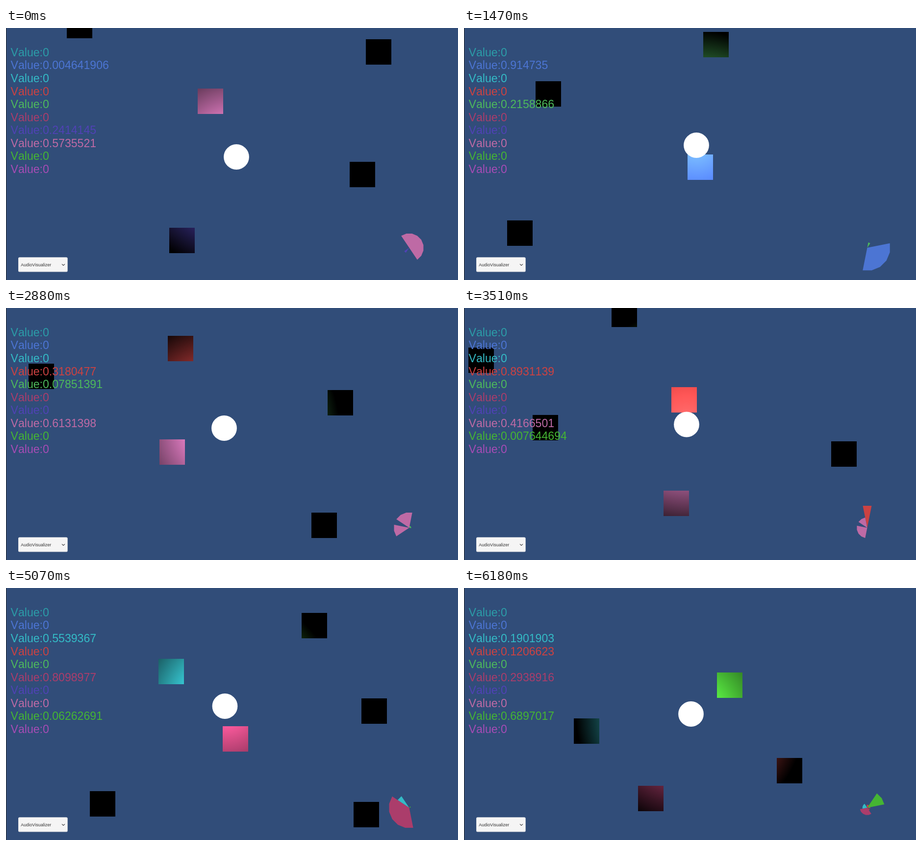
An HTML page with a canvas that plays this animation: 922x516 px, repeating every 6.23 s.

```html
<!DOCTYPE html>
<html lang="en">
<head>
<meta charset="utf-8">
<title>Sound sources</title>
<style>
  html, body { margin: 0; width: 100%; height: 100%; overflow: hidden; background: #314d79; }
  canvas { display: block; }
</style>
</head>
<body>
<canvas id="stage" width="922" height="516"></canvas>
<script>
const ctx = document.getElementById('stage').getContext('2d');
const LOOP = 6230, STEP = 30, FRAMES = 207;
const SIZE = 52, RADIUS = 25.9;
const HEARING = 260.6, FADE = 235;      // loudness reaches 0 / spans this many px
const LIGHT = 235, GLOW = 1.76;         // light radius and strength at its middle
const CENTER = { x: 461.5, y: 258 }, LAG = 12;
const DIAL = { x: 822.5, y: 450, scale: 51.5, parts: 16 };
const PART = Math.PI * 2 / DIAL.parts;
const PINK = 7;

const body = (x, y, ...rgb) => ({ x, y, rgb });
const bodies = [
  body(-120.5, 128, 43, 157, 168),
  body(727, 300, 76, 117, 211),
  body(19.5, -142.7, 52, 187, 198),
  body(433.7, -62, 204, 66, 66),
  body(759.5, 49, 77, 185, 92),
  body(150.3, -5, 171, 61, 107),
  body(359, 435, 80, 66, 181),
  body(417.2, 149.8, 190, 106, 165),
  body(311.4, -237, 69, 181, 51),
  body(-900, -900, 166, 76, 181)
];

// Scroll of the world, turning points: [ms, position, speed per second]
const pathX = [
  [0, 0, -102], [1470, -245.4, -150], [1770, -259, 0], [2880, -78, 198], [3510, 15.6, 90],
  [4200, 148.5, 198], [5070, 317.4, 180], [5400, 362, 0], [6180, 230.5, -18]
];
const pathY = [
  [0, 0, -72], [1470, -15, 216], [2050, 113, 0], [2880, 145, 144], [3510, 250, 234],
  [3920, 293, 0], [4200, 262.5, -144], [5070, 314, 192], [6180, 436, 0]
];

function hermite(path, t) {
  let i = 0;
  while (i < path.length - 2 && t >= path[i + 1][0]) i++;
  const [t0, p0, v0] = path[i], [t1, p1, v1] = path[i + 1];
  const d = (t1 - t0) / 1000, s = (t - t0) / (t1 - t0), s2 = s * s, s3 = s2 * s;
  const pos = (2 * s3 - 3 * s2 + 1) * p0 + (3 * s2 - 2 * s3) * p1
    + d * ((s3 - 2 * s2 + s) * v0 + (s3 - s2) * v1);
  const vel = 6 * (s - s2) * (p1 - p0) / d
    + (3 * s2 - 4 * s + 1) * v0 + (3 * s2 - 2 * s) * v1;
  return { pos, vel };
}

// The camera trails the player, so the ball leans towards where it goes
function view(t) {
  const x = hermite(pathX, t), y = hermite(pathY, t);
  const ball = { x: CENTER.x - x.vel / LAG, y: CENTER.y - y.vel / LAG };
  const places = bodies.map(b => ({ x: b.x + x.pos, y: b.y + y.pos }));
  const levels = places.map(p => {
    const d = Math.hypot(p.x - ball.x, p.y - ball.y);
    return Math.min(1, Math.max(0, (HEARING - d) / FADE));
  });
  return { ball, places, levels };
}

// A dial part stays with the last body that swept over it louder than its holder
function sweep(owner, { ball, places, levels }) {
  const next = owner.slice();
  places.forEach((p, i) => {
    const turn = Math.ceil(Math.atan2(p.y - ball.y, p.x - ball.x) / PART);
    const part = (turn + DIAL.parts) % DIAL.parts;
    const holder = next[part];
    if (levels[i] > (holder < 0 ? 0 : levels[holder])) next[part] = i;
  });
  return next;
}

// At the start pink holds half of the dial
let owner = Array.from({ length: DIAL.parts }, (_, s) => (s + 5) % 16 < 8 ? PINK : -1);
const frames = [];
for (let i = 0; i < FRAMES; i++) {
  const v = view(i * STEP);
  v.owner = owner = sweep(owner, v);
  frames.push(v);
}

const css = rgb => `rgb(${rgb.map(c => Math.min(255, Math.round(c))).join(',')})`;

function drawSquare(rgb, p, ball) {
  const stops = 16;
  const g = ctx.createRadialGradient(ball.x, ball.y, 0, ball.x, ball.y, LIGHT);
  for (let i = 0; i <= stops; i++) {
    const k = i / stops;
    g.addColorStop(k, css(rgb.map(c => c * GLOW * (1 - k))));
  }
  ctx.fillStyle = g;
  ctx.fillRect(Math.round(p.x - SIZE / 2), Math.round(p.y - SIZE / 2), SIZE, SIZE);
}

function drawBall({ x, y }) {
  ctx.fillStyle = '#fff';
  ctx.beginPath();
  ctx.arc(x, y, RADIUS, 0, Math.PI * 2);
  ctx.fill();
}

function drawDial({ owner, levels }) {
  const corner = (r, a) => ctx.lineTo(DIAL.x + r * Math.cos(a), DIAL.y + r * Math.sin(a));
  bodies.forEach((b, i) => {
    const r = levels[i] * DIAL.scale;
    ctx.fillStyle = css(b.rgb);
    ctx.beginPath();
    owner.forEach((holder, s) => {
      if (holder !== i) return;
      ctx.moveTo(DIAL.x, DIAL.y);
      corner(r, (s - 0.5) * PART);
      corner(r, (s + 0.5) * PART);
      ctx.closePath();
    });
    ctx.fill();
  });
}

function drawValues(levels) {
  ctx.font = '23.1px "Liberation Sans", Arial, sans-serif';
  levels.forEach((value, i) => {
    ctx.fillStyle = css(bodies[i].rgb);
    ctx.fillText('Value:' + Number(value.toPrecision(7)), 9.5, 57.9 + 26.55 * i);
  });
}

function drawMenu() {
  const panel = (color, x, y, w, h) => {
    ctx.fillStyle = color;
    ctx.beginPath();
    ctx.roundRect(x, y, w, h, 2.5);
    ctx.fill();
  };
  panel('#c9ccd1', 25, 469.5, 100.7, 30);
  panel('#f5f5f5', 25.3, 469.8, 100, 29);
  ctx.fillStyle = '#323232';
  ctx.font = '9px "Liberation Sans", Arial, sans-serif';
  ctx.fillText('AudioVisualizer', 30.3, 487.8);
  ctx.strokeStyle = '#3a3a3a';
  ctx.lineWidth = 1.1;
  ctx.beginPath();
  ctx.moveTo(114, 483.3);
  ctx.lineTo(117, 486.2);
  ctx.lineTo(120, 483.3);
  ctx.stroke();
}

function draw(v) {
  ctx.fillStyle = '#314d79';
  ctx.fillRect(0, 0, 922, 516);
  bodies.forEach((b, i) => drawSquare(b.rgb, v.places[i], v.ball));
  drawBall(v.ball);
  drawDial(v);
  drawValues(v.levels);
  drawMenu();
  ctx.fillStyle = '#262a30';
  ctx.fillRect(0, 0, 1, 516);
}

ctx.fontKerning = 'none';
const start = performance.now();
function tick() {
  const t = (performance.now() - start) % LOOP;
  draw(frames[Math.min(FRAMES - 1, Math.floor(t / STEP))]);
  requestAnimationFrame(tick);
}
tick();
</script>
</body>
</html>
```
